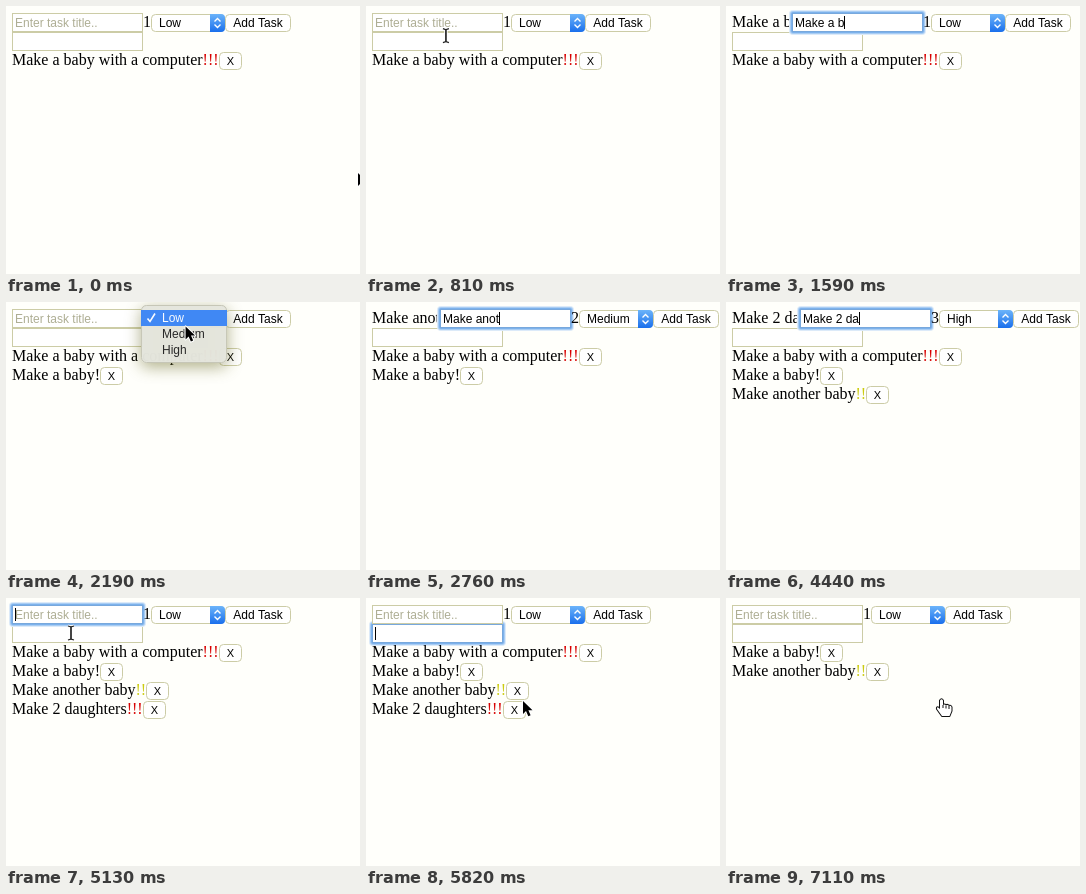
Write an HTML page with a canvas that moves like this. It is 354 px wide and 268 px high and loops after 7.14 s.

```html
<!DOCTYPE html>
<html lang="en">
<head>
<meta charset="utf-8">
<title>Task list</title>
<style>
  html, body { margin: 0; width: 100%; height: 100%; overflow: hidden; background: #fffffb; }
  canvas { display: block; }
</style>
</head>
<body>
<canvas id="stage" width="354" height="268"></canvas>
<script>
const ctx = document.getElementById('stage').getContext('2d');
const LOOP = 7140;
const SERIF = '16px "Liberation Serif", serif';
const SANS = '12px "Liberation Sans", sans-serif';
const BORDER = '#cccca6';
const LEVELS = ['', 'Low', 'Medium', 'High'];
const MARK_COLORS = ['', '#000', '#cccc10', '#d80000'];

// Typed tasks: first key, ms per key, submit time, and removal time
const tasks = [
  { text: 'Make a baby with a computer', level: 3, start: -1, pace: 1, add: -1, remove: 6500 },
  { text: 'Make a baby', level: 1, start: 1110, pace: 65, add: 1800 },
  { text: 'Make another baby', level: 2, start: 2560, pace: 23, add: 3060, open: 2100, pick: 2280 },
  { text: 'Make 2 daughters', level: 3, start: 4080, pace: 44, add: 4830, open: 3420, pick: 3680, remove: 5850 }
];
const MENU_FADE = 150;
const titleFocus = [[900, 2100], [2520, 3420], [3930, 5220]];
const filterFocus = [[5220, 5850]];
const hidden = [[1110, 1890], [2560, 3120], [4080, 4860]];

// Pointer path: time, x, y
const path = [
  [0, 351, 166], [30, 351, 166], [750, 84, 40], [880, 75, 17], [1890, 75, 17],
  [2070, 182, 16], [2120, 182, 16], [2250, 176, 29], [2330, 176, 29], [2500, 80, 17],
  [3120, 80, 17], [3380, 182, 16], [3440, 182, 16], [3600, 174, 40], [3720, 174, 40],
  [3910, 75, 17], [4860, 75, 17], [5120, 65, 35], [5520, 65, 35], [5800, 156, 102],
  [5880, 156, 102], [6060, 186, 134], [6240, 214, 104], [6420, 224, 53], [6540, 224, 53],
  [6800, 214, 101], [LOOP, 214, 101]
];

const within = (ranges, t) => ranges.some(([from, to]) => t >= from && t < to);

function write(text, x, y, font, color = '#000') {
  ctx.font = font;
  ctx.fillStyle = color;
  ctx.fillText(text, x, y);
  return x + ctx.measureText(text).width;
}

function roundBox(x, y, w, h, r, fill, stroke) {
  ctx.beginPath();
  ctx.roundRect(x, y, w, h, r);
  if (fill) { ctx.fillStyle = fill; ctx.fill(); }
  if (stroke) { ctx.strokeStyle = stroke; ctx.lineWidth = 1; ctx.stroke(); }
}

function polyline(points, color, width) {
  ctx.beginPath();
  points.forEach(([x, y]) => ctx.lineTo(x, y));
  ctx.strokeStyle = color;
  ctx.lineWidth = width;
  ctx.stroke();
}

function input(x, y, value, placeholder, focused) {
  if (focused) {
    roundBox(x - 3, y - 3, 137, 25, 4, '#dceaf9');
    roundBox(x - 2, y - 2, 135, 23, 3, '#a9cdf3');
    roundBox(x - 1, y - 1, 133, 21, 2, '#7db2ec');
  }
  ctx.fillStyle = '#fff';
  ctx.fillRect(x, y, 131, 19);
  ctx.strokeStyle = focused ? '#78a8dc' : BORDER;
  ctx.lineWidth = 1;
  ctx.strokeRect(x + .5, y + .5, 130, 18);
  const end = write(value, x + 3, y + 14, SANS);
  if (!value) write(placeholder, x + 3, y + 14, SANS, '#aeae94');
  if (focused) {
    ctx.fillStyle = '#000';
    ctx.fillRect(Math.round(end), y + 3, 1, 13);
  }
}

function button(label, x, y, w, h, font = SANS) {
  roundBox(x + .5, y + .5, w - 1, h - 1, 4, '#fff', BORDER);
  ctx.textAlign = 'center';
  write(label, x + w / 2, y + h / 2 + 4, font);
  ctx.textAlign = 'left';
}

function select(label, x, y) {
  roundBox(x + .5, y + .5, 73, 17, 4, '#fff', BORDER);
  const blue = ctx.createLinearGradient(0, y, 0, y + 18);
  blue.addColorStop(0, '#6cb4fa');
  blue.addColorStop(1, '#1a6fec');
  roundBox(x + 59, y, 15, 18, [0, 4, 4, 0], blue);
  const mid = x + 66.5;
  polyline([[mid - 3, y + 7.5], [mid, y + 4.5], [mid + 3, y + 7.5]], '#fff', 1.4);
  polyline([[mid - 3, y + 10.5], [mid, y + 13.5], [mid + 3, y + 10.5]], '#fff', 1.4);
  write(label, x + 8, y + 13, SANS);
}

function menu(alpha, hover) {
  ctx.save();
  ctx.globalAlpha = alpha;
  ctx.shadowColor = 'rgba(105,105,35,.55)';
  ctx.shadowBlur = 16;
  ctx.shadowOffsetY = 4;
  roundBox(135, 3, 86, 58, 5, '#e6e7de');
  ctx.shadowColor = 'transparent';
  roundBox(135.5, 3.5, 85, 57, 5, null, '#c6c6b6');
  if (hover) {
    ctx.fillStyle = '#3b86f5';
    ctx.fillRect(135, hover * 16 - 8, 86, 16);
  }
  for (let i = 1; i <= 3; i++)
    write(LEVELS[i], 156, 4 + 16 * i, SANS, i === hover ? '#fff' : '#222');
  polyline([[141.5, 16.5], [144, 19.5], [149, 11.5]], hover === 1 ? '#fff' : '#222', 1.6);
  ctx.restore();
}

function outlined(d, x, y, fill, stroke, width) {
  const shape = new Path2D(d);
  ctx.save();
  ctx.translate(x, y);
  ctx.lineJoin = 'round';
  ctx.lineWidth = width;
  ctx.strokeStyle = stroke;
  ctx.stroke(shape);
  ctx.fillStyle = fill;
  ctx.fill(shape);
  ctx.restore();
}

const ARROW = 'M1 1V14L4 11L6.3 16.2L8.6 15.2L6.4 10.2H10.5Z';
const HAND = 'M0 1.5Q1.5-.8 3 1.5V6Q4.5 4.8 6 6.3Q7.5 5.2 9 7Q10.8 6.2 11.5 8V12L9.5 17H2L-3 10Q-3.6 8-1.8 8.4L0 10Z';

function pointerAt(t) {
  const i = path.findIndex(([time]) => time > t);
  const [t0, x0, y0] = path[i - 1], [t1, x1, y1] = path[i];
  const p = (t - t0) / (t1 - t0), ease = p * p * (3 - 2 * p);
  return [x0 + (x1 - x0) * ease, y0 + (y1 - y0) * ease];
}

function pointer(x, y, t, overMenu) {
  const overInput = !overMenu && x > 6 && x < 137 && y > 7 && y < 45;
  if (overInput) {
    const beam = [[x - 3, y - 7], [x, y - 6], [x, y + 6], [x - 3, y + 7]];
    const mirror = beam.map(([px, py]) => [2 * x - px, py]);
    for (const [color, width] of [['#fff', 3], ['#222', 1.2]]) {
      polyline(beam, color, width);
      polyline(mirror, color, width);
    }
  } else if (t >= 7050) {
    outlined(HAND, x, y, '#fff', '#111', 2);
    for (const [dx, dy] of [[3, 6], [6, 6.5], [9, 7]])
      polyline([[x + dx, y + dy], [x + dx, y + dy + 3]], '#111', 1);
  } else {
    outlined(ARROW, x, y, '#000', '#fff', 2);
  }
}

function draw(t) {
  ctx.fillStyle = '#fffffb';
  ctx.fillRect(0, 0, 354, 268);

  const current = tasks.find(task => t < task.add);
  let typed = '', level = 1, menuAlpha = 0;
  if (current) {
    const keys = t < current.start ? 0 : Math.floor((t - current.start) / current.pace) + 1;
    typed = current.text.slice(0, keys);
    if (t >= current.pick) level = current.level;
    if (t >= current.open)
      menuAlpha = .97 * Math.min(1, Math.max(0, 1 - (t - current.pick) / MENU_FADE));
  }

  const x = Math.round(write(typed, 6, 21, SERIF));
  input(6, 26, '', '', within(filterFocus, t));
  input(x, 7, typed, 'Enter task title..', within(titleFocus, t));
  write(level, x + 131, 21, SERIF);
  select(LEVELS[level], x + 139, 8);
  button('Add Task', x + 213, 8, 66, 18);

  tasks.filter(task => t >= task.add && !(t >= task.remove)).forEach((task, row) => {
    const y = 59 + 19 * row;
    let end = write(task.text, 6, y, SERIF);
    end = write('!'.repeat(task.level), end, y, SERIF, MARK_COLORS[task.level]);
    button('X', Math.round(end), y - 13, 23, 18, '11px "Liberation Sans", sans-serif');
  });

  const [px, py] = pointerAt(t);
  if (menuAlpha) {
    const hover = t < current.pick ? Math.min(3, Math.max(1, Math.floor((py + 8) / 16))) : 0;
    menu(menuAlpha, hover);
  }
  if (!within(hidden, t)) pointer(px, py, t, menuAlpha > 0);
}

const began = performance.now();
function frame() {
  draw((performance.now() - began) % LOOP);
  requestAnimationFrame(frame);
}
frame();
</script>
</body>
</html>
```
